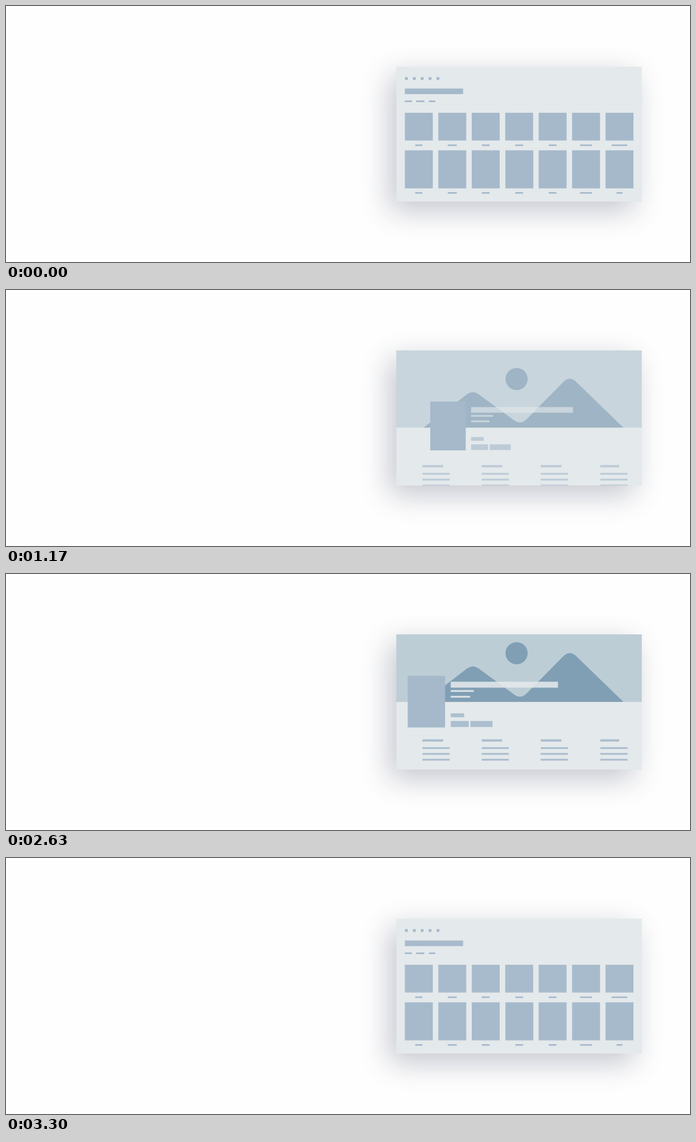
Recreate the animation shown at these times as an HTML page. Size 1222 by 458 pixels, loop 4.13 s.

```html
<!DOCTYPE html>
<html lang="en">
<head>
<meta charset="utf-8">
<title>Gallery to detail transition</title>
<style>
  html, body { margin: 0; width: 100%; height: 100%; overflow: hidden; background: #fefefe; }
  svg { display: block; width: 100%; height: 100%; }
</style>
</head>
<body>
<svg viewBox="0 0 1222 458" preserveAspectRatio="xMidYMid meet">
  <defs>
    <filter id="soft" filterUnits="userSpaceOnUse" x="540" y="0" width="682" height="458">
      <feGaussianBlur stdDeviation="26"/>
    </filter>
    <clipPath id="frame"><rect x="697.3" y="108" width="438.5" height="241.8"/></clipPath>
  </defs>
  <rect x="686" y="124" width="436" height="242" fill="rgb(70,80,105)" opacity=".32" filter="url(#soft)"/>
  <rect x="697.3" y="108.5" width="438.5" height="241.3" fill="#e4e9eb"/>
  <g clip-path="url(#frame)">
    <g id="grid" fill="#a5b9cb"></g>
    <g id="hero">
      <rect x="697" y="40" width="440" height="187.5" fill="#b6c9d2"/>
      <path fill="#7294ad" d="M746 227.5L824 167.5Q834 160.5 844 167.5L908 214.5Q919 222.5 929 213.5L996 145.5Q1007 135 1018 145L1103 227.5Z"/>
      <circle cx="912.2" cy="140.5" r="19.8" fill="#7294ad"/>
      <g id="columns" fill="#a5b9cb"></g>
    </g>
    <g id="info"></g>
    <rect id="tile" fill="#a5b9cb"/>
  </g>
  <g id="cursor" fill="#5b9bd0">
    <circle r="18" opacity=".35"/>
    <circle r="13" opacity=".5"/>
  </g>
</svg>
<script>
const LOOP = 4130, OPEN = 935, CLOSE = 2606, MOVE = 528;
const el = id => document.getElementById(id);
const clamp = x => Math.min(1, Math.max(0, x));
const mix = (a, b, p) => a + (b - a) * p;
const set = (node, attrs) => { for (const k in attrs) node.setAttribute(k, attrs[k]); };

function box(parent, x, y, width, height, fill) {
  const r = document.createElementNS('http://www.w3.org/2000/svg', 'rect');
  set(r, { x, y, width, height });
  if (fill) r.setAttribute('fill', fill);
  parent.appendChild(r);
}

// cubic-bezier(.25, .1, .25, 1)
function ease(x) {
  x = clamp(x);
  if (x === 0 || x === 1) return x;
  const curve = (a, b, u) => 3 * a * u * (1 - u) ** 2 + 3 * b * u * u * (1 - u) + u ** 3;
  let lo = 0, hi = 1;
  for (let i = 0; i < 24; i++) {
    const mid = (lo + hi) / 2;
    if (curve(.25, .25, mid) < x) lo = mid; else hi = mid;
  }
  return curve(.1, 1, lo);
}
const easeAt = (t, start, length) => ease((t - start) / length);
const cubicOut = x => 1 - (1 - clamp(x)) ** 3;

const small = { x: 892.2, y: 258.2, w: 49.9, h: 68.1 };
const large = { x: 712.5, y: 180.4, w: 66.6, h: 92 };

function buildGrid() {
  const g = el('grid');
  for (let i = 0; i < 5; i++) box(g, 712.8 + 14.1 * i, 127.2, 5, 5);
  box(g, 712.6, 147.6, 104, 10);
  [[712.6, 12.4], [732.8, 14.5], [755.6, 11.4]].forEach(([x, w]) => box(g, x, 169, w, 2.9));
  const labels = [13, 16, 14, 14, 14, 21, 28];
  labels.forEach((w, i) => {
    const x = 712.6 + 59.75 * i, mid = x + 24.9;
    box(g, x, 191, 49.9, 49.7);
    box(g, mid - w / 2, 247.7, w, 2.8);
    if (i !== 3) box(g, x, small.y, small.w, small.h);
    const low = i === 6 ? 10.5 : w;
    box(g, mid - low / 2, 333, low, 2.8);
  });
}

function buildDetail() {
  [[744, 37], [849.8, 36.6], [955.3, 37], [1061.8, 33.6]].forEach(([x, w], i) => {
    box(el('columns'), x, 294.4, w, 4.2);
    for (let row = 0; row < 3; row++) box(el('columns'), x, 308.5 + 10.4 * row, 48.6, 3.3);
  });
  const pale = '#e4e9eb', blue = '#a5b9cb', g = el('info');
  box(g, 789.2, 190.8, 191, 10.6, pale);
  box(g, 789.2, 205.7, 41, 3.3, pale);
  box(g, 789.2, 216, 34.5, 3.3, pale);
  box(g, 789.2, 247.2, 23.8, 7, blue);
  box(g, 789.2, 260.8, 32, 10.8, blue);
  box(g, 824.2, 260.8, 39.4, 10.8, blue);
}

function draw(t) {
  const closing = t >= CLOSE;

  const p = closing ? 1 - easeAt(t, CLOSE, MOVE) : easeAt(t, OPEN, MOVE);
  const size = p + 4 * p * (1 - p) * (closing ? .36 : .085);
  const w = mix(small.w, large.w, size), h = mix(small.h, large.h, size);
  const x = mix(small.x + small.w / 2, large.x + large.w / 2, p) - w / 2;
  const y = mix(small.y + small.h / 2, large.y + large.h / 2, p) - h / 2;
  set(el('tile'), { x, y, width: w, height: h });

  const heroIn = cubicOut((t - 970) / 760), heroOut = easeAt(t, CLOSE, 209);
  const heroAlpha = heroIn * (1 - heroOut);
  const rise = 47 * (1 - heroIn) + 10 * heroOut;
  set(el('hero'), { opacity: heroAlpha, transform: `translate(0 ${rise})` });
  set(el('info'), {
    opacity: heroAlpha,
    transform: `translate(${x} ${y}) scale(${w / large.w}) translate(${-large.x} ${-large.y})`
  });

  const shown = closing ? easeAt(t, 2695, 600) : 1 - easeAt(t, 954, 200);
  set(el('grid'), {
    opacity: closing ? shown * .97 : shown,
    transform: `translate(0 ${-10 * (1 - shown)})`
  });

  const cx = mix(1008, 918, easeAt(t, 160, 500));
  const press = 1 - .38 * easeAt(t, 690, 240);
  const alpha = clamp((t - 160) / 200) * (1 - clamp((t - 930) / 180));
  set(el('cursor'), { opacity: alpha, transform: `translate(${cx} 288.3) scale(${press})` });
}

buildGrid();
buildDetail();
const begin = performance.now();
function tick() {
  draw((performance.now() - begin) % LOOP);
  requestAnimationFrame(tick);
}
draw(0);
requestAnimationFrame(tick);
</script>
</body>
</html>
```
